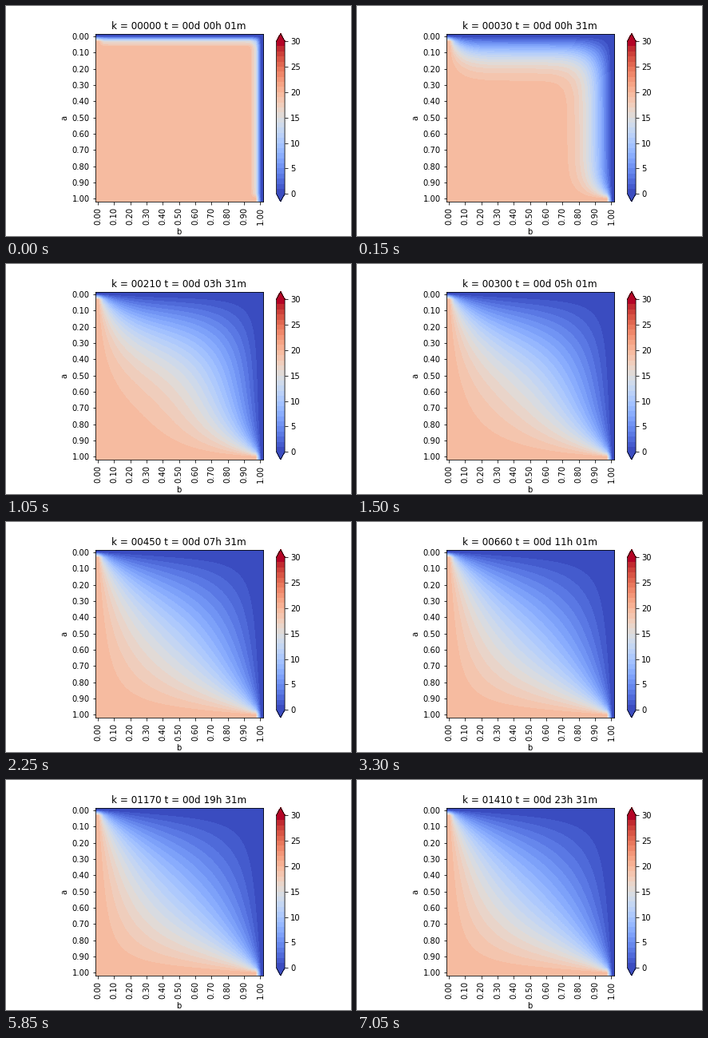
A matplotlib script that plays this animation: 432 by 288 pixels, repeating every 7200 ms.

```python
import numpy as np
import matplotlib.pyplot as plt
from matplotlib.animation import FuncAnimation

plt.rcParams["font.family"] = "DejaVu Sans"

W, H, DPI = 432, 288, 72
FRAMES, INTERVAL = 48, 150
CELLS = 31
MINUTES_PER_FRAME = 30
SUBSTEPS = 2
RATE = 0.28 / SUBSTEPS      # diffusion number of one substep
HOT, COLD = 19.999, 0.0     # HOT stays just inside the 19-20 colour band


def start_plate():
    u = np.full((CELLS, CELLS), HOT)
    u[0, :] = COLD
    u[:, -1] = COLD
    return u


def advance(u, minutes):
    """Explicit heat equation; the edge cells keep their temperature."""
    u = u.copy()
    for _ in range(minutes * SUBSTEPS):
        mid = u[1:-1, 1:-1]
        flow = u[:-2, 1:-1] + u[2:, 1:-1] + u[1:-1, :-2] + u[1:-1, 2:] - 4 * mid
        u[1:-1, 1:-1] = mid + RATE * flow
    return u


def caption(k):
    hours, mins = divmod(k + 1, 60)
    days, hours = divmod(hours, 24)
    return f"k = {k:05d} t = {days:02d}d {hours:02d}h {mins:02d}m"


fields = [advance(start_plate(), 1)]
while len(fields) < FRAMES:
    fields.append(advance(fields[-1], MINUTES_PER_FRAME))

fig, ax = plt.subplots(figsize=(W / DPI, H / DPI), dpi=DPI, facecolor="white")
fig.subplots_adjust(left=0.125, right=0.9, bottom=0.15, top=0.88)

image = ax.imshow(fields[0], cmap=plt.get_cmap("coolwarm", 30), vmin=0, vmax=30,
                  interpolation="bilinear")
fig.colorbar(image, ax=ax, extend="both", ticks=range(0, 31, 5))

ticks = np.linspace(0, CELLS - 1, 11)
labels = [f"{t / (CELLS - 1):.2f}" for t in ticks]
ax.set_xticks(ticks, labels, rotation=90)
ax.set_yticks(ticks, labels)
ax.set_xlabel("b")
ax.set_ylabel("a")
title = ax.set_title(caption(0))


def draw(i):
    image.set_data(fields[i])
    title.set_text(caption(i * MINUTES_PER_FRAME))
    return image, title


anim = FuncAnimation(fig, draw, frames=FRAMES, interval=INTERVAL,
                     repeat=True, repeat_delay=0, blit=False)
plt.show()
```
